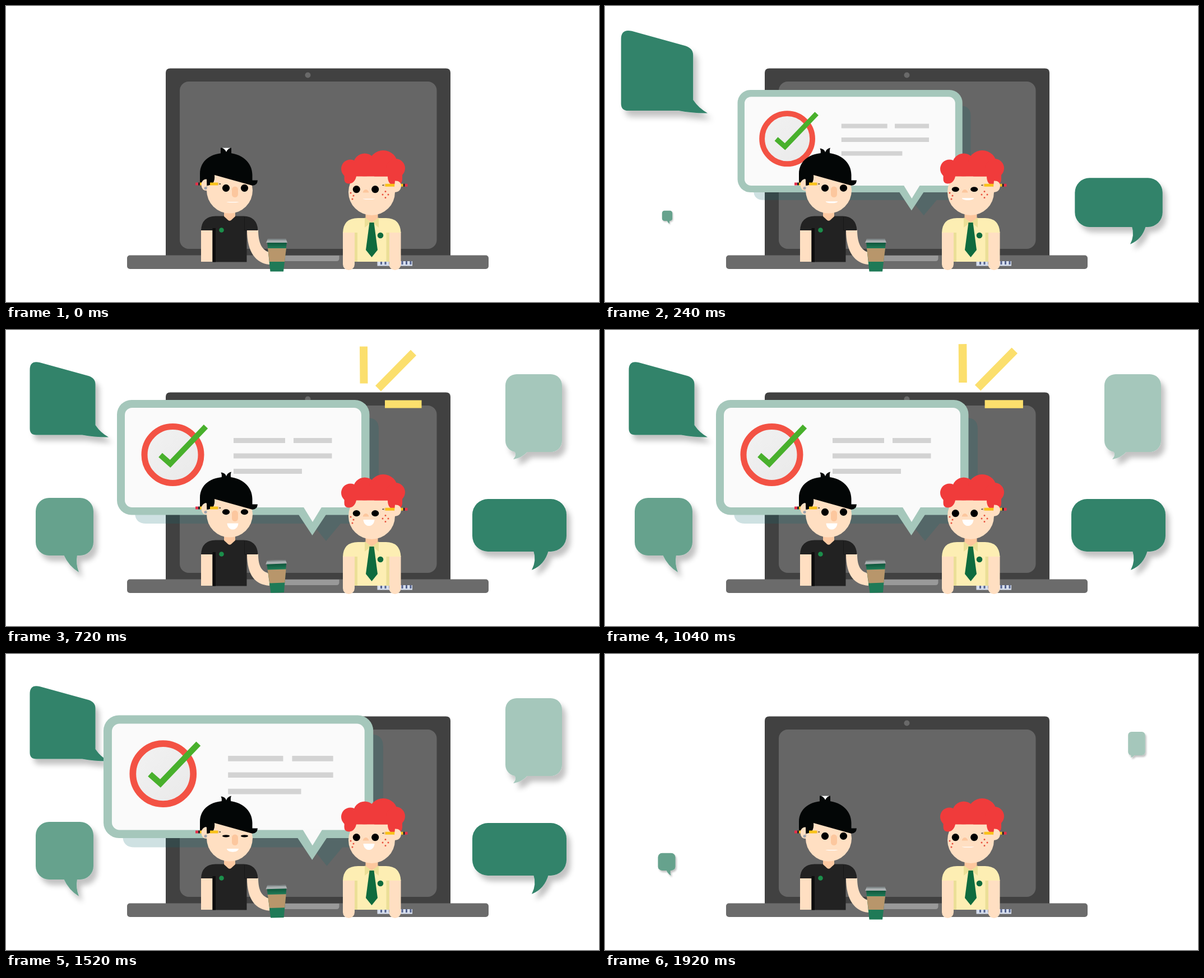
An HTML page that plays this animation: 1058 px wide and 529 px high, repeating every 2 s.

```html
<!DOCTYPE html>
<html lang="en">
<head>
<meta charset="utf-8">
<title>Laptop chat</title>
<style>
html, body { margin: 0; width: 100%; height: 100%; overflow: hidden; background: #fff; }
svg { display: block; width: 100vw; height: 100vh; }
</style>
</head>
<body>
<svg viewBox="0 0 1058 529">
  <defs>
    <filter id="soft" x="-20%" y="-20%" width="150%" height="150%">
      <feDropShadow dx="7" dy="10" stdDeviation="5" flood-color="#000" flood-opacity=".24"/>
    </filter>
    <linearGradient id="disc" x1="0" y1="0" x2="1" y2="1">
      <stop offset="0" stop-color="#f2f2f2"/><stop offset="1" stop-color="#e9e9e9"/>
    </linearGradient>
    <linearGradient id="band" x1="0" y1="0" x2="0" y2="1">
      <stop offset="0" stop-color="#0d5238"/><stop offset=".2" stop-color="#1f7a57"/>
    </linearGradient>
    <clipPath id="fringe"><rect x="590" y="250" width="130" height="54.5"/></clipPath>
  </defs>

  <!-- laptop -->
  <path d="M285 446V119.500q0-8 8-8H785q8 0 8 8V446Z" fill="#414141"/>
  <rect x="310" y="135" width="458.500" height="299" rx="16" fill="#666"/>
  <circle cx="538.500" cy="123.500" r="5" fill="#696969"/>
  <rect x="216" y="445.500" width="645" height="24.500" rx="5" fill="#6b6b6b"/>
  <path d="M483 446H594.500V451q0 5-5 5H488q-5 0-5-5Z" fill="#999"/>

  <!-- side bubbles -->
  <g id="slant" fill="#31836a" filter="url(#soft)">
    <path d="M42.500 71Q42.500 54 60 58L147 82Q159.500 86 159.500 97V170Q169 184 183 191.500Q160 192 136 187.500H54Q42.500 187.500 42.500 176Z"/>
  </g>
  <g id="square" fill="#66a28d" filter="url(#soft)">
    <rect x="53" y="300" width="103" height="103" rx="24"/>
    <path d="M103 402Q112 422 130 433Q124 418 127 402Z"/>
  </g>
  <g id="tall" fill="#a5c7bb" filter="url(#soft)">
    <rect x="891" y="79" width="101" height="139" rx="20"/>
    <path d="M907 216Q912 224 905 231Q920 229 931 217Z"/>
  </g>
  <g id="wide" fill="#31836a" filter="url(#soft)">
    <rect x="832" y="302" width="168" height="94" rx="28"/>
    <path d="M941 394Q947 412 938 429Q961 420 968 394Z"/>
  </g>

  <!-- message card -->
  <g id="card">
    <path d="M250 157H645q20 0 20 20V326q0 20-20 20H597L571 377L546 346H250q-20 0-20-20V177q0-20 20-20Z" fill="#0d6a6e" opacity=".2"/>
    <rect x="198" y="125" width="450.500" height="205.500" rx="26" fill="#a5c7bb"/>
    <path d="M522 330L546.500 367L571 330Z" fill="#a5c7bb"/>
    <rect x="212" y="139" width="422" height="178" rx="13" fill="#fafafa"/>
    <path d="M530.500 316L547 343L563.500 316Z" fill="#fafafa"/>
    <circle cx="297.500" cy="223" r="50.500" fill="url(#disc)" stroke="#f35244" stroke-width="11"/>
    <path d="M275.500 223.500L293 239L356.500 172.500" fill="none" stroke="#48b02c" stroke-width="10"/>
    <path d="M406 193h92v9h-92ZM513 193h68.500v9h-68.500ZM406 220.500h175.500v9h-175.500ZM406 248h122v9h-122Z" fill="#d3d3d3"/>
  </g>

  <g id="rays" stroke="#fbdf6d" stroke-width="14">
    <path d="M638 29.500L638.500 95.500M727 40.500L664 104.500M676 132.500H741.500"/>
  </g>

  <!-- left person -->
  <path id="arm" fill="#ffdfc2"/>
  <path d="M348 400H369V457H348Z" fill="#ffdfc2"/>
  <path d="M348 401Q349 376 374 375.500H424Q448 376 449.500 401H429.500V457.500H368.500V401Z" fill="#222"/>
  <path d="M368.500 397H374V457.500H368.500Z" fill="#0d0d0d"/>
  <path d="M425.500 377V401H429.500" fill="none" stroke="#171717"/>
  <path d="M389 364H409V376L402 382.500Q399 385 396 382.500L389 376Z" fill="#fdc9a2"/>
  <circle cx="384.500" cy="400.500" r="4.300" fill="#1b8f4b"/>
  <circle cx="399" cy="329.500" r="41" fill="#ffdfc2"/>
  <path d="M346 320V300C346 276 366 262.500 393 262.500C420 262.500 439.500 279 439.500 302V311.500H449Q448 322 438 320.500L372 302Q374 321 357 321V309Q350 310 349 320Z" fill="#030606"/>
  <g id="tuft">
    <path d="M383 253.500H402V266H383Z" fill="#030606"/>
    <path d="M385.500 253.500H400.500Q395 256 393 261Q391 256 385.500 253.500Z" fill="#fff"/>
  </g>
  <path id="spikes" d="M383.500 254.500Q391 255 393 261.500Q395 255 402 253.500Q400 258 401.500 265H384Q386 260 383.500 254.500Z" fill="#030606"/>
  <g id="pencilL"></g>
  <path d="M358 309.500Q348 310 348.500 320Q349 330 358.500 330Z" fill="#ffdfc2"/>
  <circle cx="356" cy="325.500" r="2.500" fill="#9ea3ad"/>
  <rect x="403" y="322.500" width="11" height="19.500" rx="5.500" fill="#fcc79e"/>
  <g id="eyesL"></g>
  <path id="mouthL" fill="#fff"/>

  <!-- cup -->
  <g id="cup">
    <path d="M466 422H501L495 474.500H471.500Z" fill="url(#band)"/>
    <path d="M467 433H500L497 457H470Z" fill="#b8966b"/>
    <path d="M467 416.500H499.500L502 423H464Z" fill="#a9afb0"/>
    <path d="M467 416.500H499.500L500.300 418.500H466.200Z" fill="#7d8485"/>
  </g>

  <!-- right person -->
  <rect x="662.500" y="456" width="62.500" height="8.500" fill="#d6deed"/>
  <path d="M668 459H725" stroke="#56648f" stroke-width="6" stroke-dasharray="3 4.500"/>
  <path d="M601 404H622V461.500a10.500 10.500 0 0 1-21 0ZM683.500 404H704.500V461.500a10.500 10.500 0 0 1-21 0Z" fill="#ffdfc2"/>
  <path d="M601 405Q602 379 628 379H678Q703 379 704.500 405H684V457H622V405Z" fill="#fdeeb3"/>
  <path d="M622 405H627V457H622ZM678.500 405H684V457H678.500Z" fill="#ebdf97"/>
  <path d="M641.500 366H663.500V379L652.500 388L641.500 379Z" fill="#fdc79d"/>
  <path d="M640 378L652 386.500L640 396ZM665 378L653 386.500L665 396Z" fill="#ebdf97"/>
  <path d="M648.500 387H656.500L663 436L652.500 449L642 436Z" fill="#0f6b3e"/>
  <circle cx="668" cy="410" r="5.300" fill="#0f6b3e"/>
  <circle cx="652.500" cy="332.500" r="41.500" fill="#ffdfc2"/>
  <g fill="#f03b3b">
    <g clip-path="url(#fringe)">
      <circle cx="614.500" cy="291" r="16.500"/><circle cx="640" cy="284" r="20.500"/>
      <circle cx="673" cy="284" r="26"/><circle cx="695" cy="290" r="17"/>
    </g>
    <path d="M604 290H707V310Q706 321 694 321Q681 320 681 304.500H625Q622 317.500 611 317.500Q603 317 603.500 308Z"/>
  </g>
  <g id="pencilR"></g>
  <path d="M694 312.500Q705 312 705 322Q704 333 692 333Z" fill="#ffdfc2"/>
  <path d="M636.500 333.500Q638 328 642 328Q646 328 647.500 333.500Z" fill="#fcc79e"/>
  <path d="M615 334h0M620 339h0M618 345h0M677 331.500h0M672 337h0M682 337h0M677 342.500h0" stroke="#e8503c" stroke-width="3" stroke-linecap="round"/>
  <g id="eyesR"></g>
  <path id="mouthR" fill="#fff"/>
</svg>
<script>
const LOOP = 2000, STEP = 80;
const $ = id => document.getElementById(id);
const set = (id, name, value) => $(id).setAttribute(name, value);

const ramp = (t, start, time) => Math.min(1, Math.max(0, (t - start) / time));
const smooth = p => p * p * (3 - 2 * p);
const cubicOut = p => 1 - (1 - p) ** 3;
const backIn = p => p * p * (2.7 * p - 1.7);
const spring = ms => 1 - Math.exp(-ms / 69) * Math.cos(Math.PI * ms / 160);

const grow = (start, time) => t => cubicOut(ramp(t, start, time));

// Each part scales about `at`, then leaves with a short swell.
const pops = {
  slant: { at: [183, 192], enter: t => spring(Math.max(0, t - 80)), leave: 1641, time: 205 },
  square: { at: [112.4, 380], enter: grow(226, 220), leave: 1697 },
  tall: { at: [951.5, 165], enter: grow(348, 220), leave: 1697 },
  wide: { at: [924, 380], enter: t => .934 * cubicOut(ramp(t, 0, 280)) + .066 * smooth(ramp(t, 420, 200)), leave: 1680 },
  card: { at: [550, 352.6], enter: grow(0, 460), leave: 1457 },
  rays: { at: [638, 132], enter: grow(430, 130), leave: 900 }
};

function popSize({ enter, leave, time = 240 }, t) {
  return enter(t) * (1 - backIn(ramp(t, leave, time)));
}

function pop(id, t) {
  const [x, y] = pops[id].at, s = popSize(pops[id], t);
  set(id, 'display', s > .001 ? 'inline' : 'none');
  set(id, 'transform', `translate(${x} ${y}) scale(${s}) translate(${-x} ${-y})`);
}

// Openness of an eye: 0 at the middle of a blink, 1 outside it.
const blink = (t, mid, half) => .5 - .5 * Math.cos(Math.PI * ramp(Math.abs(t - mid), 0, half));

function eyes(id, xs, y, open) {
  const ry = Math.max(.6, 6.6 * open);
  $(id).innerHTML = xs.map(x => `<ellipse cx="${x}" cy="${y}" rx="6.6" ry="${ry}"/>`).join('');
}

function mouth(id, x, y, m, rise) {
  const w = 11 - m, top = y - rise * m, d = 1.8 + 13 * m;
  set(id, 'd', `M${x - w} ${top}H${x + w}C${x + w - 1} ${top + d} ${x - w + 1} ${top + d} ${x - w} ${top}Z`);
}

function pencil(id, x, y, flip, parts) {
  $(id).innerHTML = `<g transform="translate(${x} ${y}) scale(${flip} 1)">` +
    parts.map(([a, b, c]) => `<path d="M${a}-2.5H${b}V2.5H${a}Z" fill="${c}"/>`).join('') +
    '<path d="M40-2.5L45.5 0L40 2.5Z" fill="#e9bd8c"/><path d="M43-1.2L45.5 0L43 1.2Z" fill="#111"/></g>';
}

function draw(t) {
  Object.keys(pops).forEach(id => pop(id, t));
  const covered = popSize(pops.card, t) > .8;
  set('tuft', 'display', covered ? 'none' : 'inline');
  set('spikes', 'display', covered ? 'inline' : 'none');

  eyes('eyesL', [392.5, 425.5], 325.3, blink(t, 513, 307) * blink(t, 1596, 200));
  eyes('eyesR', [625.3, 658.7], 327.6, blink(t, 455, 360) * blink(t, 1800, 120));
  mouth('mouthL', 404.5, 350, ramp(t, 150, 500) - ramp(t, 1320, 360), 4.5);
  mouth('mouthR', 647.5, 344.5, ramp(t, 110, 520) - ramp(t, 1700, 220), 5.5);

  const up = smooth(ramp(t, 380, 320)) - smooth(ramp(t, 1380, 360)), dy = -5 * up;
  set('cup', 'transform', `translate(0 ${dy}) rotate(${-2 * up} 483 445)`);
  set('arm', 'd', `M430 400H450C450 424 457 ${437 + dy} 470 ${440 + dy}V${462 + dy}C446 ${460 + dy} 430 440 430 400Z`);
}

const ends = [[0, 5, '#e5304a'], [5, 8, '#222']], yellow = '#f9c21a';
pencil('pencilL', 338, 318, 1, [...ends, [8, 12, yellow], [26, 40, yellow]]);
pencil('pencilR', 716.5, 320.3, -1, [...ends, [8, 40, yellow]]);

function tick(now) {
  draw(Math.floor(now % LOOP / STEP) * STEP);
  requestAnimationFrame(tick);
}
draw(0);
requestAnimationFrame(tick);
</script>
</body>
</html>
```
